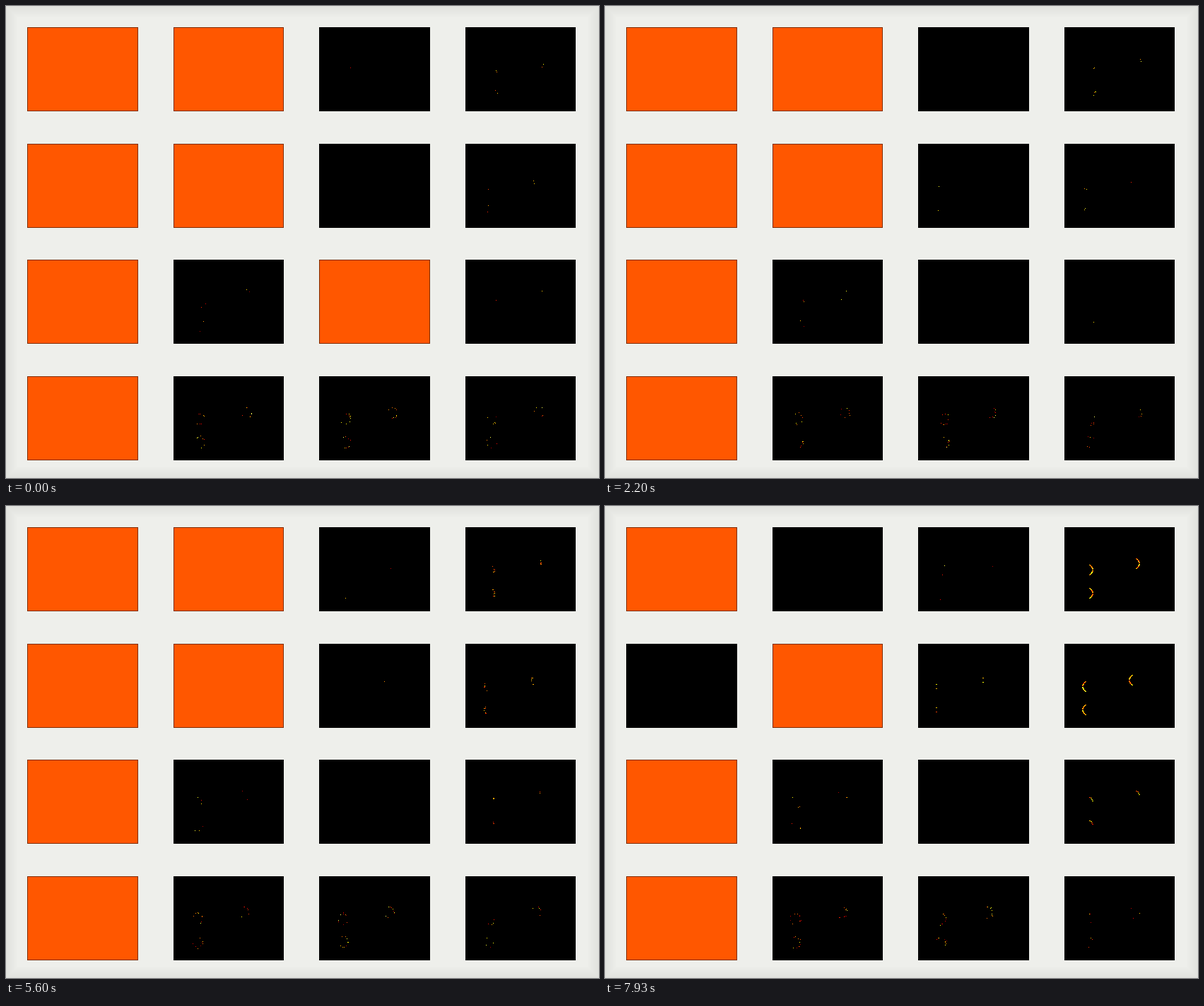
These frames come from a looping animation (839x668 px, 8 s). An HTML page with a canvas:

```html
<!DOCTYPE html>
<html lang="en">
<head>
<meta charset="utf-8">
<title>Heat map grid</title>
<style>
html, body { margin: 0; width: 100%; height: 100%; overflow: hidden; background: #eeefeb; }
canvas { display: block; width: 839px; height: 668px; }
</style>
</head>
<body>
<canvas id="stage" width="839" height="668"></canvas>
<script>
const ctx = document.getElementById('stage').getContext('2d');
const LOOP = 8000, STEP = 66.7, LAST = 10, TAU = Math.PI * 2;
const GAP_X = 206.5, GAP_Y = 164.7, H = 119;

// Updates: start in ms and number of steps; rows refresh from top to bottom.
const UPDATES = [[0, 1], [600, 2], [1400, 1], [2200, 3], [2930, 2], [3730, 4],
  [4600, 3], [5400, 4], [6270, 6], [7070, 4], [7930, 1]];

// Dots gather on three rings, given by their centres at the last update.
const RINGS = [[32, 60], [98, 51], [32, 93]];
const RADIUS = 7, DRIFT = 0.5;

// Dots per ring grow from few to many on an arc around the angle side.
const cell = (few, many, side = 0, span = TAU, dark = 0) => ({ few, many, side, span, dark });
const plain = (dark = Infinity) => cell(0, 0, 0, 0, dark);
const CELLS = [
  [plain(), plain(6270), cell(0.3, 1.3), cell(2, 14, 0, 2.3)],
  [plain(), plain(), cell(0.2, 1.5, Math.PI, 1.5), cell(1.5, 14, Math.PI, 2.3)],
  [plain(), cell(2, 3), plain(70), cell(0.6, 4, -0.7, 1)],
  [plain(), cell(7, 10), cell(9, 9), cell(5, 3)]
];
CELLS[1][0].dark = 7930;

const mix = (a, b, k) => a + (b - a) * k;

function seeded(seed) {
  let s = seed * 7919 + 13;
  return () => {
    s = (s + 0x6d2b79f5) | 0;
    let v = Math.imul(s ^ (s >>> 15), 1 | s);
    v ^= v + Math.imul(v ^ (v >>> 7), 61 | v);
    return ((v ^ (v >>> 14)) >>> 0) / 4294967296;
  };
}

// Black, red, yellow, white.
function heat(v) {
  const part = a => Math.round(255 * Math.min(1, Math.max(0, a)));
  return `rgb(${part(v / 0.365)},${part((v - 0.365) / 0.381)},${part((v - 0.746) / 0.254)})`;
}

function drawDots(px, py, { few, many, side, span }, update, rnd) {
  const grown = (update / LAST) ** 3;
  const onArc = span < TAU;
  const loose = onArc ? 1 - grown : 1;
  for (const [cx, cy] of RINGS) {
    const x = px + cx + DRIFT * (LAST - update), y = py + cy;
    const n = Math.floor(mix(few, many, grown) + rnd());
    for (let i = 0; i < n; i++) {
      const at = mix((i + 0.5) / n, rnd(), loose * 0.6);
      const angle = side + span * (at - 0.5);
      const r = RADIUS + loose * 2 * (rnd() - 0.5);
      const bright = onArc ? mix(0.4, 0.8, rnd()) : mix(0.2, 0.85, rnd());
      ctx.fillStyle = heat(bright);
      ctx.fillRect(Math.round(x + r * Math.cos(angle)), Math.round(y + r * 1.1 * Math.sin(angle)),
        onArc && rnd() < grown ? 2 : 1, 1);
    }
  }
}

function drawBack() {
  ctx.fillStyle = '#eeefeb';
  ctx.fillRect(0, 0, 839, 668);
  for (let i = 0; i < 16; i++) {
    ctx.strokeStyle = `rgba(0,0,0,${0.06 * (1 - i / 16)})`;
    ctx.strokeRect(i + 0.5, i + 0.5, 838 - 2 * i, 667 - 2 * i);
  }
}

function updateAt(t, row) {
  return UPDATES.findLastIndex(([start, steps]) =>
    t >= start + Math.floor(row * steps / 4) * STEP);
}

function draw(t) {
  drawBack();
  CELLS.forEach((line, row) => {
    const y = Math.round(30 + row * GAP_Y), update = Math.max(0, updateAt(t, row));
    line.forEach((c, col) => {
      const x = Math.round(30.2 + col * GAP_X), w = 157 - col % 2;
      const dark = t >= c.dark;
      ctx.fillStyle = dark ? '#000' : '#ff5700';
      ctx.fillRect(x, y, w, H);
      if (dark) {
        drawDots(x, y, c, update, seeded(update * 16 + row * 4 + col + 1));
      } else {
        ctx.strokeStyle = 'rgba(0,0,0,0.5)';
        ctx.strokeRect(x + 0.5, y + 0.5, w - 1, H - 1);
      }
    });
  });
}

function tick() {
  draw(performance.now() % LOOP);
  requestAnimationFrame(tick);
}
tick();
</script>
</body>
</html>
```
